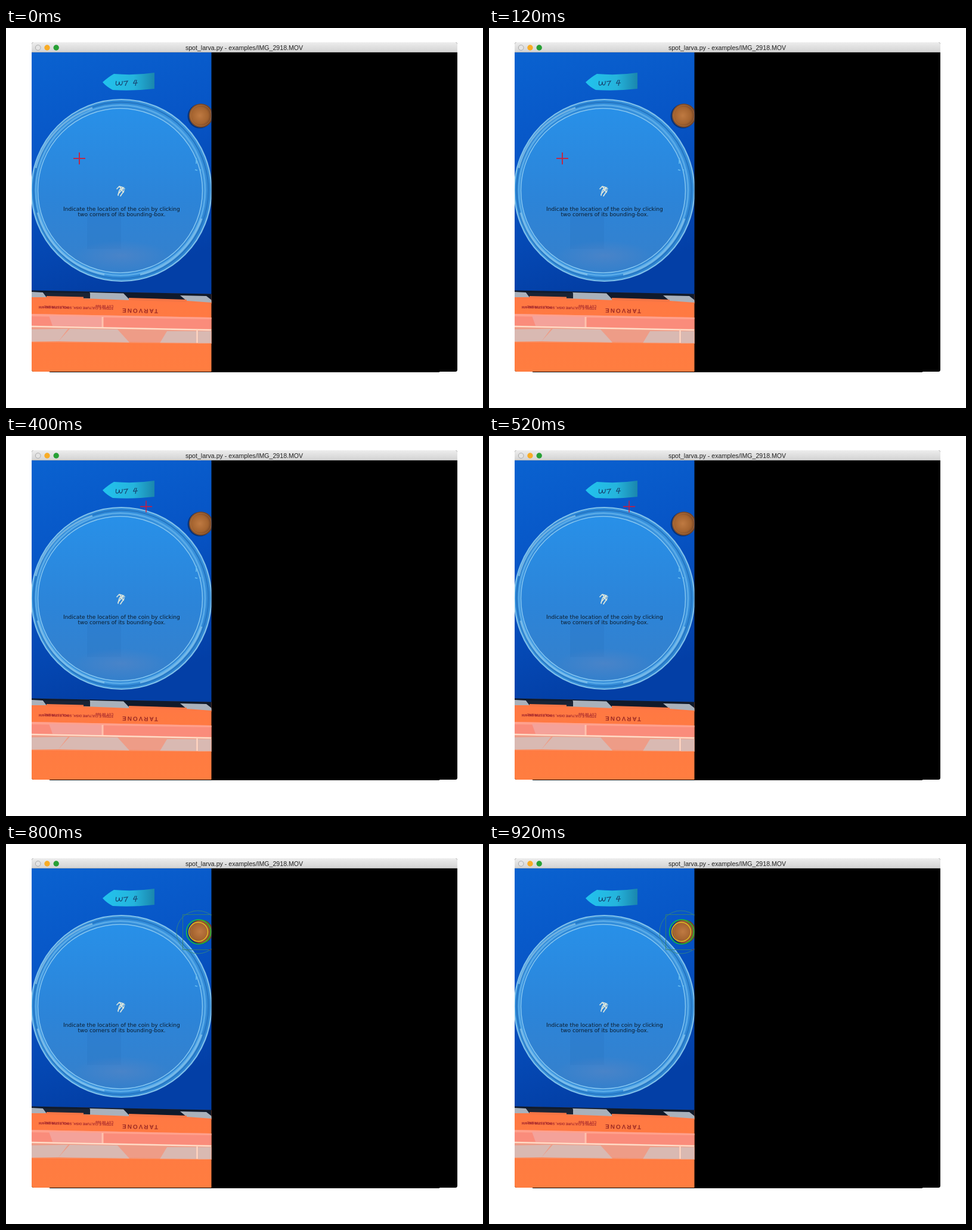
Animation, 800 px wide and 638 px high, one loop 1 s. Source, as an HTML page:

```html
<!DOCTYPE html>
<html lang="en">
<head>
<meta charset="utf-8">
<title>spot_larva.py</title>
<style>
html, body { margin: 0; width: 100%; height: 100%; overflow: hidden; background: #fff; }
svg { display: block; width: 100vw; height: 100vh; }
.title { font: 10.6px "Liberation Sans", Arial, sans-serif; fill: #222; }
.hint { font: 9.1px "DejaVu Sans", sans-serif; fill: #0b1c2c; }
.print { font: bold 5.6px "Liberation Sans", Arial, sans-serif; fill: #a3262c; }
.brand { font: bold 10px "Liberation Sans", Arial, sans-serif; letter-spacing: 2px; fill: #9c2a24; }
</style>
</head>
<body>
<svg viewBox="0 0 800 638" preserveAspectRatio="none">
  <defs>
    <linearGradient id="bar" x2="0" y2="1">
      <stop stop-color="#ededed"/><stop offset="1" stop-color="#d2d2d2"/>
    </linearGradient>
    <linearGradient id="mat" x2=".25" y2="1">
      <stop stop-color="#0a62d0"/><stop offset=".45" stop-color="#0755c6"/><stop offset="1" stop-color="#033fa6"/>
    </linearGradient>
    <linearGradient id="glass" x2="0" y2="1">
      <stop stop-color="#2890e8"/><stop offset=".55" stop-color="#2c84d8"/><stop offset="1" stop-color="#3680cb"/>
    </linearGradient>
    <linearGradient id="rim" x2="1" y2="1">
      <stop stop-color="#2480d4"/><stop offset=".5" stop-color="#3a94de"/><stop offset="1" stop-color="#2a7fce"/>
    </linearGradient>
    <linearGradient id="tag">
      <stop stop-color="#22c3ee"/><stop offset=".6" stop-color="#25b4dc"/><stop offset="1" stop-color="#1a86ad"/>
    </linearGradient>
    <radialGradient id="coin" cx=".45" cy=".5">
      <stop stop-color="#bf7a42"/><stop offset=".7" stop-color="#a4632f"/><stop offset="1" stop-color="#744426"/>
    </radialGradient>
    <linearGradient id="box" x2="0" y2="1">
      <stop stop-color="#ff7843"/><stop offset="1" stop-color="#ff7d40"/>
    </linearGradient>
    <radialGradient id="haze">
      <stop stop-color="#5a86c4" stop-opacity=".55"/><stop offset="1" stop-color="#5a86c4" stop-opacity="0"/>
    </radialGradient>
    <clipPath id="window"><rect x="43" y="24" width="714" height="553" rx="3.5"/></clipPath>
    <clipPath id="video"><rect x="43" y="41" width="301.5" height="536"/></clipPath>
  </defs>

  <rect x="73" y="576" width="654" height="2"/>
  <g clip-path="url(#window)">
    <rect x="43" y="24" width="714" height="553"/>
    <rect x="43" y="24" width="714" height="17" fill="url(#bar)"/>
    <path d="M43 40.5H757" stroke="#b5b5b5"/>
    <circle cx="53.7" cy="33" r="4.4" fill="#e4e4e4" stroke="#aaa"/>
    <circle cx="69" cy="33" r="4.7" fill="#f8ac26"/>
    <circle cx="84.2" cy="33" r="4.7" fill="#27a035"/>
    <text class="title" x="399.5" y="36.7" text-anchor="middle">spot_larva.py - examples/IMG_2918.MOV</text>

    <g clip-path="url(#video)">
      <rect x="43" y="41" width="302" height="406" fill="url(#mat)"/>

      <path d="M162 91Q172 82 181 77Q216 80 249 75V102Q214 106 179 104Q169 99 162 91Z" fill="url(#tag)"/>
      <path d="M185 89q-2 8 2 7q3-1 3-6q0 8 4 5q2-3 1-6M197 90l7-1q-3 4-4 8M217 87q-4 6-3 6l7-1M219 87l-2 10"
            fill="none" stroke="#173f6c" stroke-width="1.2"/>

      <!-- dish -->
      <ellipse cx="193.5" cy="272.5" rx="151" ry="152.5" fill="url(#rim)" stroke="#7fc0ea" stroke-width="2.2"/>
      <g fill="none">
        <ellipse cx="193" cy="272.5" rx="146.5" ry="148" stroke="#2475c2" stroke-width="2"/>
        <ellipse cx="192" cy="272.5" rx="142" ry="143" stroke="#58aae8" stroke-width="3"/>
        <path d="M50 235A143 145 0 0 1 145 134M53 310A143 144 0 0 0 165 414M225 414A144 145 0 0 0 328 320"
              stroke="#96cef0" stroke-width="3" opacity=".65"/>
      </g>
      <ellipse cx="191.5" cy="273" rx="138" ry="138" fill="url(#glass)" stroke="#84c5f0" stroke-width="1.5"/>
      <rect x="136" y="308" width="57" height="63" fill="#246fb9" opacity=".22"/>
      <ellipse cx="193" cy="382" rx="80" ry="25" fill="url(#haze)"/>
      <path d="M319 218v10M326 237v5M317 238l4 1" stroke="#66bdf0" stroke-width="1.6"/>
      <path d="M186 270l4-4l7 2l-7 4l9-2M190 273l-2 8M188 279l8-9M192 282l6-9M191 267l6 9"
            fill="none" stroke="#dce6dc" stroke-width="1.7" stroke-linecap="round"/>
      <g class="hint" text-anchor="middle">
        <text x="194" y="306.7">Indicate the location of the coin by clicking</text>
        <text x="194" y="316.2">two corners of its bounding-box.</text>
      </g>

      <circle cx="325" cy="148" r="20.5" fill="#07347c"/>
      <circle cx="327" cy="147" r="20" fill="url(#coin)"/>
      <circle cx="327" cy="147" r="17.5" fill="none" stroke="#c88c54" opacity=".5"/>

      <!-- box at the bottom -->
      <path d="M43 441L345 447V577H43Z" fill="url(#box)"/>
      <path d="M43 440.500L345 446.500V460L43 452Z" fill="#101a2b"/>
      <path d="M43 451L345 459V463H43Z" fill="#ff7843"/>
      <path d="M43 443L62 444L68 452H43ZM141 444L197 445.500L208 457L130 454ZM292 449L336 450L345 457V461L303 458Z" fill="#a9b1bb"/>
      <path d="M62 444L141 445V454L68 452Z" fill="#1a2435"/>
      <path d="M68 450L130 451.500V455L68 454ZM206 453L303 456V460L206 457Z" fill="#f47545"/>
      <g class="print">
        <text transform="translate(180 469) rotate(181)">STERILE CULTURE DISH, SINGLE USE 100 MM</text>
        <text transform="translate(180 465.500) rotate(181)">LOT 00 000</text>
        <text transform="translate(105 467) rotate(181)">POLYSTYRENE</text>
      </g>
      <text class="brand" transform="translate(255 472) rotate(181)">TARVONE</text>
      <path d="M43 480L345 486V506L43 501Z" fill="#fa8c7b"/>
      <path d="M43 480L345 486V489L43 484Z" fill="#ffa18d"/>
      <path d="M72 483L162 485V502L78 500Z" fill="#f4a29a"/>
      <path d="M162 485V503" stroke="#ffc1ad" stroke-width="3"/>
      <path d="M43 502L345 508V529L43 526Z" fill="#ee9c87"/>
      <path d="M43 506L104 505L88 526L43 527ZM107 505L187 506L207 528L88 526ZM270 509H319V529H258ZM322 509H345V530H322Z" fill="#d9b9b2"/>
      <path d="M43 501L345 507" stroke="#ffdcc8" stroke-width="2.5"/>
      <path d="M320.500 508V529" stroke="#ffe5d5" stroke-width="2"/>
      <path d="M43 527L345 529.500" stroke="#fa9268"/>

      <path id="cross" fill="none"/>
      <g id="found" fill="none">
        <circle cx="322" cy="148" r="36" stroke="#3b8b78" stroke-width=".8"/>
        <path d="M345 118.500H296.500V177.500H345" stroke="#36806f" stroke-width=".9"/>
        <circle cx="323" cy="147.500" r="20.500" stroke="#16c832" stroke-width="1.4"/>
        <circle cx="322.500" cy="147.500" r="16" stroke="#e5bd22" stroke-width="1.4"/>
        <path d="M340 177.500h4" stroke="#633650"/>
      </g>
    </g>
  </g>
</svg>
<script>
const cross = document.getElementById("cross");
const found = document.getElementById("found");
const STEP = 200;
// Pointer stops: x, y, colour, line width
const stops = [
  [123, 219, "#bd2948", 2],
  [157.5, 153, "#c72b42", 2],
  [235, 118.5, "#e0142c", 1.3],
  [296, 118.5, "#ee1530", 1.3]
];

function draw(now) {
  const stop = stops[Math.floor(now / STEP) % (stops.length + 1)];
  cross.style.display = stop ? "" : "none";
  found.style.display = stop ? "none" : "";
  if (stop) {
    const [x, y, color, width] = stop;
    cross.setAttribute("d", `M${x - 10} ${y}h20M${x} ${y - 10}v20`);
    cross.setAttribute("stroke", color);
    cross.setAttribute("stroke-width", width);
  }
}

const start = performance.now();
function tick() {
  draw(performance.now() - start);
  requestAnimationFrame(tick);
}
tick();
</script>
</body>
</html>
```
